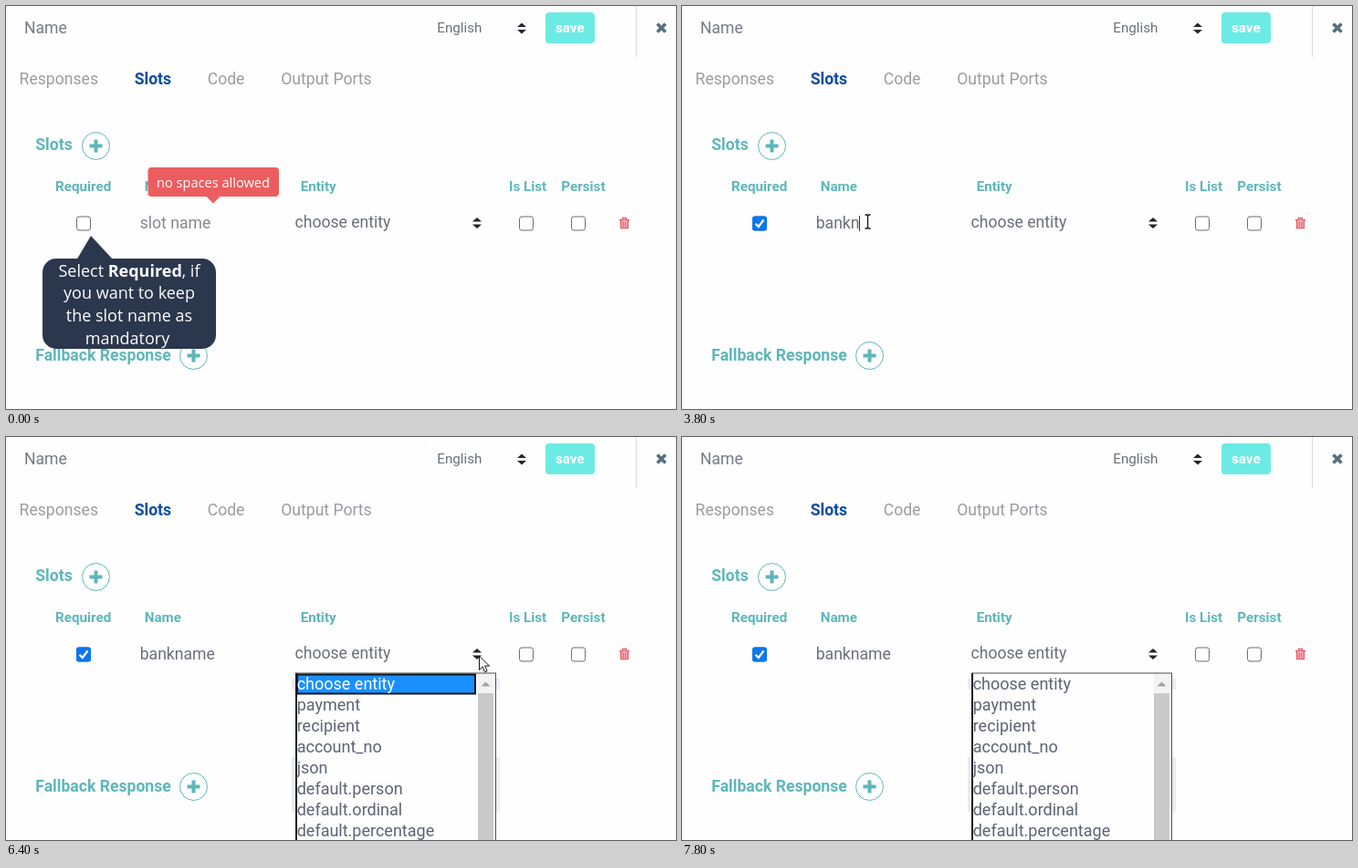
Animation of 734 by 442 pixels, one loop 8 s. Source, as an HTML page:

```html
<!DOCTYPE html>
<html lang="en">
<head>
<meta charset="utf-8">
<style>
html, body { margin: 0; width: 734px; height: 442px; overflow: hidden; background: #fefefe; }
svg { display: block; font: 17.6px Roboto, sans-serif; fill: #6a6f77; }
.tab { fill: #9b9ca1; }
.teal { fill: #5eb6ba; font-weight: 700; }
.head, .small { font-size: 15.2px; }
.ring { fill: none; stroke: #5eb6ba; }
.box { fill: #fff; stroke: #6d6d6d; }
.note { fill: #2b374c; }
.note text { fill: #fff; font: 18px "Open Sans", sans-serif; text-anchor: middle; }
#list text { font-size: 18px; fill: #5b6473; }
</style>
</head>
<body>
<svg width="734" height="442" viewBox="0 0 734 442">
  <defs>
    <path id="sort" d="M-5-1.5L0-6L5-1.5ZM-5 1.5L0 6L5 1.5Z" fill="#22262b"/>
    <g id="plus">
      <circle class="ring" r="15"/>
      <path d="M-7 0H7M0-7V7" stroke="#5eb6ba" stroke-width="4"/>
    </g>
    <rect id="check" class="box" x="-7.5" y="-7.5" width="15" height="15" rx="2.5"/>
  </defs>

  <text x="20" y="30" fill="#757b82">Name</text>
  <path d="M460.5 8V40" stroke="#f9f9fa"/>
  <text class="small" x="472.3" y="29">English</text>
  <use href="#sort" x="565" y="24.5"/>
  <rect x="591" y="7" width="54" height="34" rx="4" fill="#6cebe4"/>
  <text class="small" x="602" y="29" fill="#fff" font-weight="700">save</text>
  <path d="M690.5 0V56" stroke="#d9dade"/>
  <path d="M713.5 19.5L722.5 28.5M722.5 19.5L713.5 28.5" stroke="#546f7f" stroke-width="3.6"/>

  <g class="tab">
    <text x="14.6" y="86">Responses</text>
    <text x="140.7" y="86" fill="#0b4da2" font-weight="700">Slots</text>
    <text x="220.7" y="86">Code</text>
    <text x="301.2" y="86">Output Ports</text>
  </g>

  <g class="teal">
    <text x="32.3" y="158">Slots</text>
    <text x="32.3" y="389">Fallback Response</text>
    <g class="head">
      <text x="54" y="203">Required</text>
      <text x="151.7" y="203">Name</text>
      <text x="322.7" y="203">Entity</text>
      <text x="551" y="203">Is List</text>
      <text x="608.3" y="203">Persist</text>
    </g>
  </g>
  <use href="#plus" x="98.5" y="153.5"/>
  <use href="#plus" x="205.5" y="383.5"/>

  <use href="#check" x="85" y="238.5"/>
  <g id="ticked">
    <rect x="77" y="230.5" width="16" height="16" rx="2.5" fill="#0b76ef"/>
    <path d="M80.5 238.8L83.8 242L89.5 234.5" fill="none" stroke="#fff" stroke-width="2.2"/>
  </g>
  <text id="name" x="146.7" y="244"></text>
  <path id="caret" stroke="#333" d="M.5 230V247"/>
  <path id="squiggle" fill="none" stroke="#e23b3b" stroke-width="1.2"/>
  <text x="316.5" y="243">choose entity</text>
  <use href="#sort" x="516" y="238"/>
  <use href="#check" x="570" y="238.5"/>
  <use href="#check" x="627" y="238.5"/>
  <g fill="none" stroke="#ee5b6c" stroke-width="1.5">
    <path d="M672 234.7H683M675.5 234V232.6H679.5V234"/>
    <path d="M673.6 235V243.6H681.4V235" fill="#f9b8bf"/>
    <path d="M676.3 236.5V242M678.7 236.5V242" stroke-width="1.2"/>
  </g>

  <g id="warning">
    <path d="M219 208.5H235L227 216.5Z" fill="#ec5d5f"/>
    <rect x="155.5" y="177" width="143.5" height="32" rx="4" fill="#ec5d5f"/>
    <text x="227" y="199" fill="#fff" text-anchor="middle" style="font:500 14.6px 'Open Sans',sans-serif">no spaces allowed</text>
  </g>

  <g id="note1" class="note">
    <path d="M77 279L93 252L118 279Z"/>
    <rect x="40" y="277" width="190" height="99" rx="15"/>
    <text x="135" y="297">Select <tspan font-weight="700">Required</tspan>, if</text>
    <text x="135" y="321">you want to keep</text>
    <text x="135" y="346">the slot name as</text>
    <text x="133" y="371">mandatory</text>
  </g>
  <g id="note2" class="note">
    <path d="M180 201L210 214L223 201Z"/>
    <rect x="151.5" y="135" width="171.5" height="68" rx="12"/>
    <text x="237" y="164">Enter slot name</text>
    <text x="237" y="188">without space</text>
  </g>

  <g id="list">
    <path d="M313 265H541V277H313ZM313 351H541V411H313Z" fill="#ebecf3"/>
    <rect x="317.5" y="259" width="219" height="190" fill="#fefefe" stroke="#4a4d52"/>
    <path d="M318 259V442" stroke="#16181c" stroke-width="2"/>
    <rect x="517" y="260" width="17" height="182" fill="#f3f3f3"/>
    <rect x="517" y="281" width="17" height="161" fill="#c9c9c9"/>
    <path d="M520.5 273.5L525.5 268.5L530.5 273.5Z" fill="#a4a4a4"/>
    <rect id="hover" x="319" y="260.5" width="195" height="21" fill="#1a90ff" stroke="#10141c" stroke-width="2"/>
  </g>

  <path id="ibeam" d="M-3-7.5H-1L0-6.5L1-7.5H3M0-6.5V6.5M-3 7.5H-1L0 6.5L1 7.5H3" fill="none" stroke="#111" stroke-width="1.3"/>
  <path id="arrow" d="M0 0V15.5L3.6 12L6 17.8L8.6 16.7L6.2 11.1H11Z" fill="#fff" stroke="#111"/>
</svg>

<script>
const $ = id => document.getElementById(id);
const LOOP = 8000, STEP = 200, WORD = 'bankname';
const TYPED = [[3000, 1], [3200, 2], [3400, 3], [3600, 4], [3800, 5], [4000, 6], [4200, 8]];
// pointer path: time, x, y
const PATH = [[1000, 92, 256], [1200, 83, 240], [1400, 83, 240], [1800, 203.5, 236.5],
              [5400, 203.5, 236.5], [6000, 518.5, 240]];

const options = ['choose entity', 'payment', 'recipient', 'account_no', 'json',
                 'default.person', 'default.ordinal', 'default.percentage'].map((label, i) => {
  const row = document.createElementNS('http://www.w3.org/2000/svg', 'text');
  row.textContent = label;
  row.setAttribute('x', 318.7);
  row.setAttribute('y', 276.5 + 23 * i);
  return $('list').appendChild(row);
});
$('squiggle').setAttribute('d', 'M147 246' + 'l2 1.6l2-1.6'.repeat(20));

const fade = (id, opacity) => $(id).setAttribute('opacity', opacity);
const show = (id, on) => fade(id, on ? 1 : 0);
const place = (id, x, y) => $(id).setAttribute('transform', `translate(${x} ${y})`);

function pointer(t) {
  const i = PATH.findIndex(p => p[0] > t);
  if (i < 0) return PATH.at(-1).slice(1);
  if (i === 0) return PATH[0].slice(1);
  const [t0, x0, y0] = PATH[i - 1], [t1, x1, y1] = PATH[i];
  const u = (t - t0) / (t1 - t0), k = u * u * (3 - 2 * u);
  return [x0 + (x1 - x0) * k, y0 + (y1 - y0) * k];
}

function draw(t) {
  const count = TYPED.reduce((n, [at, len]) => t >= at ? len : n, 0);
  const name = $('name');
  name.textContent = count ? WORD.slice(0, count) : 'slot name';
  name.style.fill = count ? '#6a6f77' : '#85898e';
  place('caret', 146 + (count ? Math.round(name.getComputedTextLength()) : 1), 0);
  show('caret', t >= 2800 && t < 4800);
  show('squiggle', t >= 5400 && t < 6400);
  show('ticked', t >= 1400);
  show('warning', t < 3000);
  fade('note1', t < 800 ? 1 : t < 1000 ? 0.5 : 0);
  fade('note2', t < 4000 || t >= 5400 ? 0 : t < 4200 || t >= 5200 ? 0.5 : 1);

  const hover = t < 7400;
  show('list', t >= 6400);
  show('hover', hover);
  options[0].style.fill = hover ? '#fff' : '';

  const [x, y] = pointer(t);
  const visible = t >= 1000 && t < 7400, overField = x > 140 && x < 300;
  show('ibeam', visible && overField);
  show('arrow', visible && !overField);
  place('ibeam', x, y);
  place('arrow', x, y);
}

const start = performance.now();
function tick() {
  const t = (performance.now() - start) % LOOP;
  draw(Math.floor(t / STEP) * STEP);
  requestAnimationFrame(tick);
}
tick();
</script>
</body>
</html>
```
